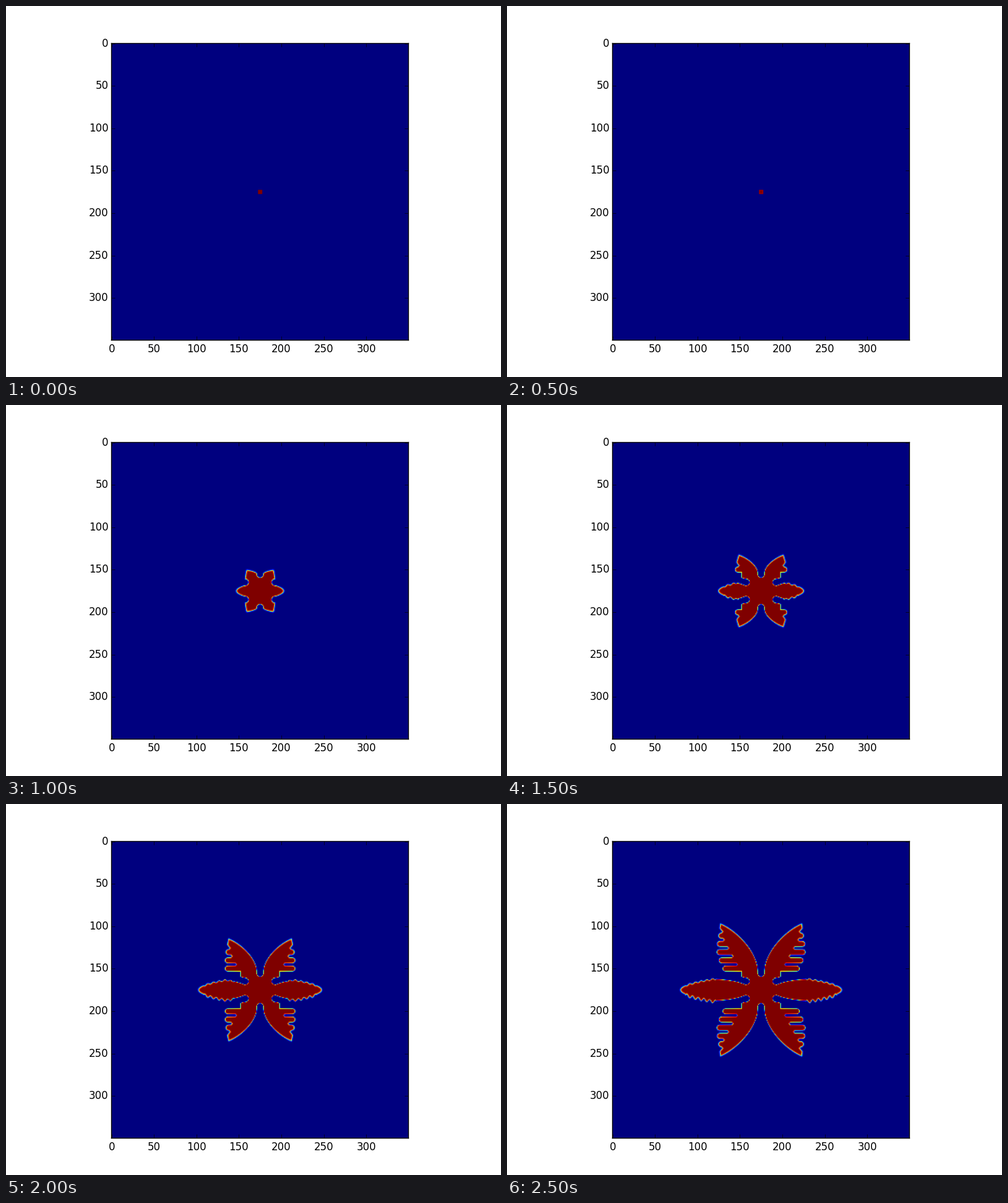
Write a matplotlib script that moves like this. It is 800x600 px and loops after 3 s.

```python
import numpy as np
import matplotlib.pyplot as plt
from matplotlib.animation import FuncAnimation
from matplotlib.path import Path

plt.style.use("classic")
plt.rcParams["font.family"] = "DejaVu Sans"

SIZE = 350             # grid cells per side
MID = SIZE // 2        # seed cell
CELL = 480 / SIZE      # stage pixels per cell
NOTCH = 5.5            # radius of the gaps between arms, in pixels
BRANCH_Y = 34.5        # height of the lowest side branch
BRANCH_GAP = 13.3      # distance between side branches
BRANCH_R = 4.3         # half thickness of a side branch

# All shapes below are in stage pixels around the seed, x outward and y up.


def arc(x, y, radius, start, end, n=8):
    a = np.radians(np.linspace(start, end, n))
    return list(zip(x + radius * np.cos(a), y + radius * np.sin(a)))


def bezier(p0, p1, p2, p3, n=30):
    t = np.linspace(0, 1, n)[:, None]
    p0, p1, p2, p3 = map(np.array, (p0, p1, p2, p3))
    curve = ((1 - t) ** 3 * p0 + 3 * t * (1 - t) ** 2 * p1
             + 3 * t ** 2 * (1 - t) * p2 + t ** 3 * p3)
    return [tuple(p) for p in curve]


def slanted_arm(tx, ty):
    """Smooth inner flank up to the tip, then side branches back down."""
    width, height = tx - NOTCH, ty - 27
    pts = arc(0, 27, NOTCH, -90, 0)
    pts += bezier((NOTCH, 27), (4, 27 + 0.415 * height),
                  (NOTCH + 0.56 * width, 27 + 0.86 * height), (tx, ty))

    def reach(y):
        grown = tx + 6 * min(1, 3 * (ty - y) / ty)
        return min(grown, 62 + 0.45 * (y - BRANCH_Y))

    count = max(0, int((ty - 47) // BRANCH_GAP) + 1)
    head = min(ty - 2, BRANCH_Y + BRANCH_GAP * (count - 0.5) + 5.5)
    pts.append((reach(head), head))
    for k in reversed(range(count)):
        y = BRANCH_Y + BRANCH_GAP * k
        gap = y + BRANCH_GAP / 2
        root = min(38 + 7.2 * k, reach(gap) - 5.5)
        pts += [(root + 2, gap + 2.2), (root, gap), (root + 2, gap - 2.2)]
        pts += arc(reach(y) - BRANCH_R, y, BRANCH_R, 90, -90)
    if count:
        pts += [(31.5, 30), (31.5, 21.5), (29, 20.5)]
    return pts + arc(24, 14, NOTCH, 90, 270)


def flank(length, bump, lift):
    """Half width of the sideways arm: widening core, parabolic wavy tip."""
    x = np.linspace(24, length, 120)
    back = length - x
    core = 8 + 11 * (1 - np.exp((24 - x) / 25))
    tip = 2.4 * np.sqrt(back)
    wave = bump * (lift + np.cos(2 * np.pi * (back - 14.7) / 9.2))
    wavy = (back > 8) & (back < 57) & (x > 37)
    return x, np.minimum(core, tip) + wave * wavy


def outline(age):
    """Closed contour of the crystal in cells; tips advance steadily."""
    slanted = np.array(slanted_arm(21 + 14.8 * age, 33.5 + 24.4 * age))
    length = 38 + 30.7 * age
    x, top = flank(length, 1.1, 0)
    _, bottom = flank(length, 0.018 * length, 0.6)
    half = np.vstack([slanted, np.column_stack([x, top]),
                      np.column_stack([x, -bottom])[::-1],
                      slanted[::-1] * (1, -1)])
    return np.vstack([half, half[-2:0:-1] * (-1, 1)]) / CELL


def crystal(age):
    """Phase field: a step across the contour, softer towards the tips."""
    pts = outline(age)
    x, y = np.meshgrid(np.arange(101), np.arange(85, -86, -1))
    grid = np.column_stack([x.ravel(), y.ravel()]).astype(float)
    dist2 = np.full(len(grid), np.inf)
    for a, b in zip(pts, np.roll(pts, -1, axis=0)):
        if max(a[0], b[0]) < -1:
            continue
        d = b - a
        t = np.clip((grid - a) @ d / max(d @ d, 1e-9), 0, 1)
        gap = grid - a - t[:, None] * d
        dist2 = np.minimum(dist2, (gap ** 2).sum(axis=1))
    sign = np.where(Path(pts).contains_points(grid), 1, -1)
    radius = np.hypot(*grid.T) / pts[:, 0].max()
    edge = 0.25 + 0.55 * np.minimum(radius, 1.1) ** 2
    right = 0.5 + 0.5 * np.tanh(sign * np.sqrt(dist2) / edge)
    right = right.reshape(x.shape)
    field = np.zeros((SIZE, SIZE))
    field[MID - 85:MID + 86, MID - 100:MID + 101] = np.hstack(
        [right[:, :0:-1], right])
    return field


def seed(rim):
    field = np.zeros((SIZE, SIZE))
    field[MID - 2:MID + 3, MID - 2:MID + 3] = rim
    field[MID - 1:MID + 2, MID - 1:MID + 2] = 1
    return field


fields = [seed(1), seed(0.97)] + [crystal(age) for age in range(4)]
# Colours are mapped before scaling so that hard edges get no rainbow rim.
images = [plt.cm.jet(f) for f in fields]

fig, ax = plt.subplots(figsize=(8, 6), dpi=100, facecolor="white")
picture = ax.imshow(images[0], interpolation="bilinear", origin="upper")
ax.set_xlim(-0.5, SIZE - 0.5)
ax.set_ylim(SIZE - 0.5, -0.5)
ax.set_xticks(range(0, 301, 50))
ax.set_yticks(range(0, 301, 50))
ax.tick_params(axis="y", pad=3.3)


def draw(i):
    picture.set_data(images[i])
    return (picture,)


anim = FuncAnimation(fig, draw, frames=len(images), interval=500,
                     repeat=True, repeat_delay=0, blit=False)
plt.show()
```
